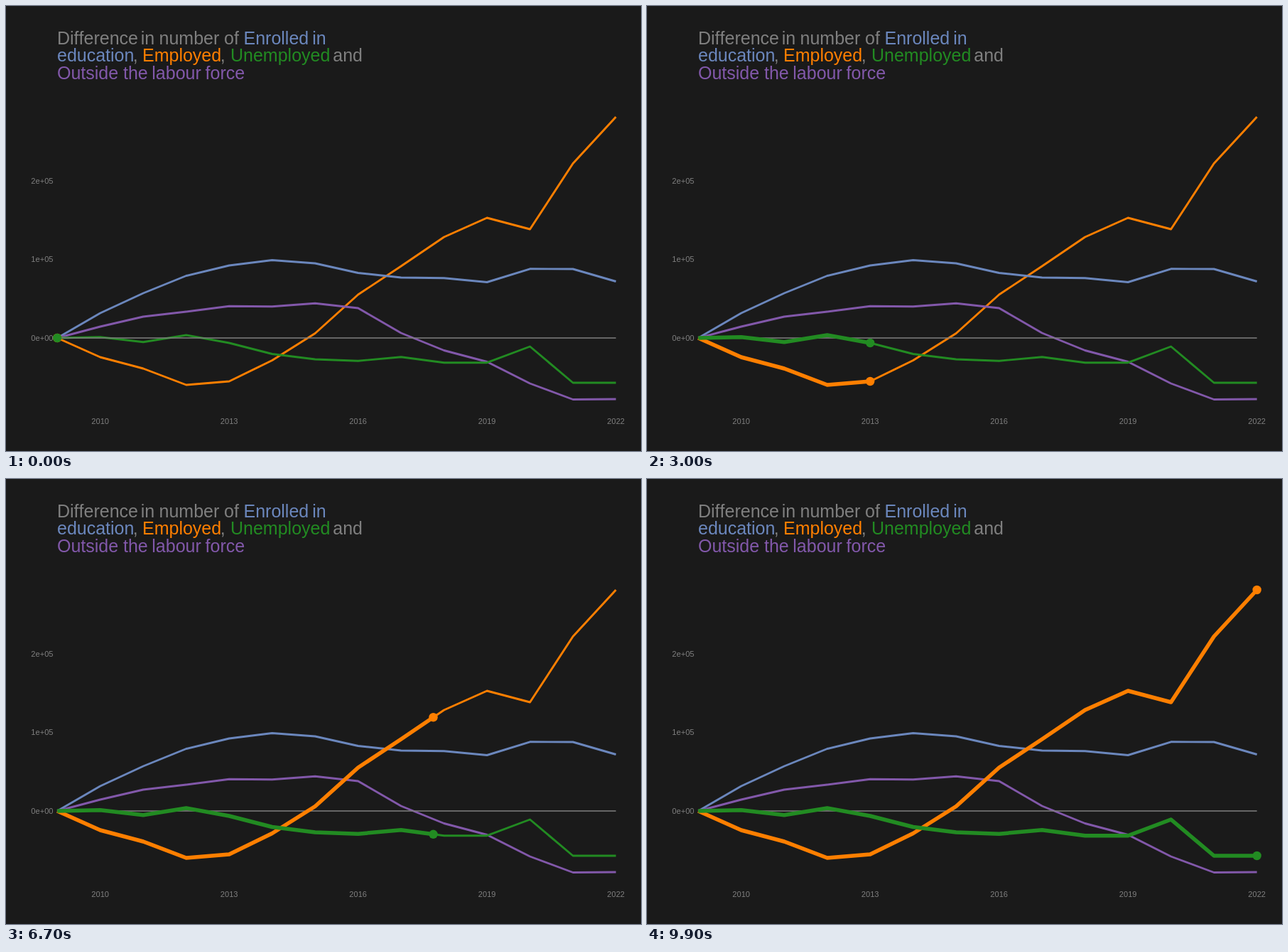
An HTML page that plays this animation: 894 by 626 pixels, repeating every 10 s.

```html
<!DOCTYPE html>
<html lang="en">
<head>
<meta charset="utf-8">
<style>
html, body { margin: 0; width: 100%; height: 100%; overflow: hidden; background: #1a1a1a; }
svg { display: block; font: 11.11px "Liberation Sans", Arial, sans-serif; font-kerning: none; }
.title { font-size: 25px; }
polyline { fill: none; stroke-linejoin: round; }
</style>
</head>
<body>
<svg id="chart" width="894" height="626" viewBox="0 0 894 626"></svg>
<script>
const GRAY = '#7f7f7f', BLUE = '#6b87bd', ORANGE = '#ff7f00', GREEN = '#228b22', PURPLE = '#8258aa';
const ZERO = 467, YEARS = 13, LAST = 99;
const chart = document.getElementById('chart');
const xAt = year => 72.2 + 60.5 * year;

// Heights in pixels, one per year from 2009 to 2022
const employed = [467, 494, 510, 533, 528, 498.5, 460.5, 406, 366, 325, 298, 314, 221.5, 156];
const enrolled = [467, 432, 404, 379.5, 365, 357.5, 362, 375.5, 382, 382.7, 388.5, 369.8, 370, 387.5];
const outside = [467, 451, 437, 430, 422.3, 422.8, 418.3, 425, 460, 484.5, 500.5, 531, 553.5, 553];
const unemployed = [467, 465.8, 472.8, 463, 474, 489.5, 497, 499.2, 493.7, 501.8, 501.7, 479, 530, 530];

function add(tag, attrs, text = '') {
  const el = document.createElementNS('http://www.w3.org/2000/svg', tag);
  for (const key in attrs) el.setAttribute(key, attrs[key]);
  el.textContent = text;
  return chart.appendChild(el);
}

const yAt = (data, year) => {
  const i = Math.min(Math.floor(year), YEARS - 1);
  return data[i] + (data[i + 1] - data[i]) * (year - i);
};

function points(data, end) {
  const path = data.slice(0, Math.floor(end) + 1).map((y, i) => [xAt(i), y]);
  if (end % 1) path.push([xAt(end), yAt(data, end)]);
  return path.join(' ');
}

const title = [
  [54, [[72, 'Difference', GRAY], [189.7, 'in', GRAY], [215.5, 'number', GRAY], [307, 'of', GRAY],
    [334.5, 'Enrolled', BLUE], [431.3, 'in', BLUE]]],
  [78.3, [[72, 'education', BLUE], [178.7, ',', GRAY], [192, 'Employed', ORANGE], [301.7, ',', GRAY],
    [316, 'Unemployed', GREEN], [460.3, 'and', GRAY]]],
  [102.5, [[72, 'Outside', PURPLE], [165, 'the', PURPLE], [205.3, 'labour', PURPLE], [280.6, 'force', PURPLE]]]
];
for (const [y, words] of title)
  for (const [x, word, fill] of words) add('text', { x, y, fill, class: 'title' }, word);

['0e+00', '1e+05', '2e+05'].forEach((label, i) =>
  add('text', { x: 66.5, y: ZERO + 4 - 110.7 * i, fill: GRAY, 'text-anchor': 'end' }, label));
for (let year = 1; year <= YEARS; year += 3)
  add('text', { x: xAt(year), y: 588, fill: GRAY, 'text-anchor': 'middle' }, 2009 + year);

for (const [data, stroke] of [[employed, ORANGE], [enrolled, BLUE], [outside, PURPLE], [unemployed, GREEN]])
  add('polyline', { points: points(data, YEARS), stroke, 'stroke-width': 2.9 });
add('line', { x1: xAt(0), x2: xAt(YEARS), y1: ZERO, y2: ZERO, stroke: GRAY, 'stroke-width': 1.3 });

const tracked = [[employed, ORANGE], [unemployed, GREEN]];
const trails = tracked.map(([, stroke]) => add('polyline', { stroke, 'stroke-width': 5.5 }));
const dots = tracked.map(([, fill]) => add('circle', { r: 6.2, fill }));

// Each year takes a whole number of steps, so the pace varies slightly
const stepOf = year => Math.round(year * LAST / YEARS);
function yearAt(step) {
  let i = 0;
  while (i < YEARS - 1 && stepOf(i + 1) <= step) i++;
  return i + (step - stepOf(i)) / (stepOf(i + 1) - stepOf(i));
}

function draw() {
  const year = yearAt(Math.floor(performance.now() % 10000 / 100));
  tracked.forEach(([data], i) => {
    trails[i].setAttribute('points', points(data, year));
    dots[i].setAttribute('cx', xAt(year));
    dots[i].setAttribute('cy', yAt(data, year));
  });
  requestAnimationFrame(draw);
}
draw();
</script>
</body>
</html>
```
